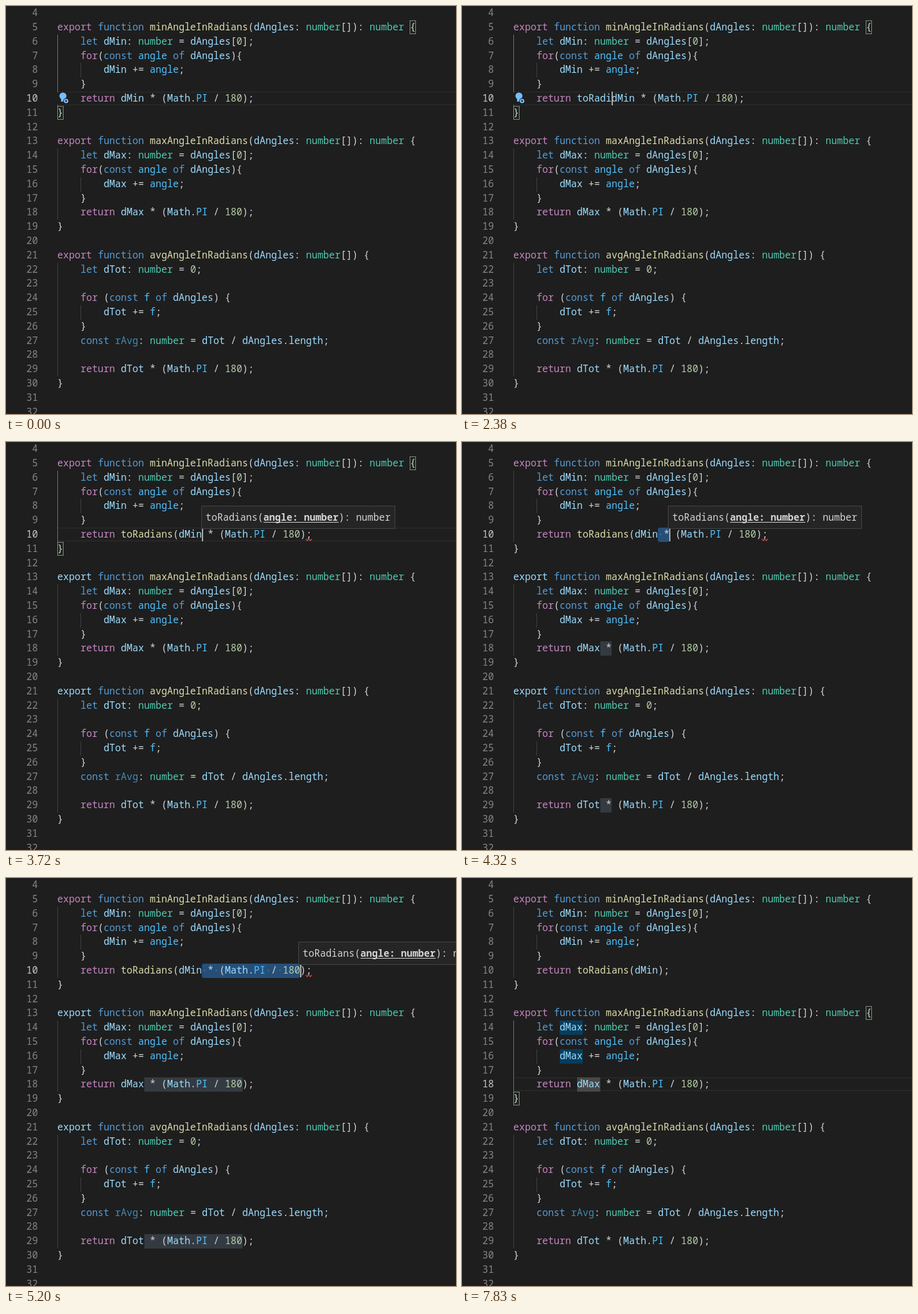
Recreate the animation shown at these times as an HTML page with a canvas. Size 719 by 653 pixels, loop 8000 ms.

```html
<!DOCTYPE html>
<html lang="en">
<head>
<meta charset="utf-8">
<style>
  html, body { margin: 0; height: 100%; overflow: hidden; background: #1e1e1e; }
  canvas { display: block; }
</style>
</head>
<body>
<canvas id="stage" width="719" height="653"></canvas>
<script>
const ctx = document.getElementById('stage').getContext('2d');
const LOOP = 8000, LEFT = 82, CHAR = 9.237, ROW = 22.8, FIRST_LINE = 4;
const MONO = '"Noto Sans Mono", monospace';
const CODE_SIZE = CHAR / 0.6;
const PUNCTUATION = '#d4d4d4';

const source = `
export function minAngleInRadians(dAngles: number[]): number {
    let dMin: number = dAngles[0];
    for(const angle of dAngles){
        dMin += angle;
    }
    return dMin * (Math.PI / 180);
}

export function maxAngleInRadians(dAngles: number[]): number {
    let dMax: number = dAngles[0];
    for(const angle of dAngles){
        dMax += angle;
    }
    return dMax * (Math.PI / 180);
}

export function avgAngleInRadians(dAngles: number[]) {
    let dTot: number = 0;

    for (const f of dAngles) {
        dTot += f;
    }
    const rAvg: number = dTot / dAngles.length;

    return dTot * (Math.PI / 180);
}

`.split('\n');

const tokenColors = [
  [/^(export|return|for)$/, '#c586c0'],
  [/^(function|let|const|of)$/, '#569cd6'],
  [/^number$/, '#4ec9b0'],
  [/^(angle|f|PI)$/, '#4fc1ff'],
  [/^rAvg$/, '#3f8bb4'],
  [/Radians$/, '#dcdcaa'],
  [/^\d+$/, '#b5cea8'],
  [/^\w+$/, '#9cdcfe'],
];

// Times at which each letter of the call is typed and the caret steps over the argument.
const typedAt = [1780, 1850, 1990, 2110, 2230, 2350, 2460, 2580, 2710, 2910];
const steppedAt = [3190, 3330, 3460, 3590];
const passed = (times, t) => times.filter(time => t >= time).length;
const between = (t, from, to) => t >= from && t < to;

const colX = col => LEFT + col * CHAR;
const rowY = line => Math.round(137 + (line - 10) * ROW);

function rect(x, y, w, h, color) {
  ctx.fillStyle = color;
  ctx.fillRect(x, y, w, h);
}

function frame(x, y, w, h, fill, stroke) {
  rect(x, y, w, h, fill);
  ctx.strokeStyle = stroke;
  ctx.lineWidth = 1;
  ctx.strokeRect(x + 0.5, y + 0.5, w - 1, h - 1);
}

function disc(x, y, r, color) {
  ctx.fillStyle = color;
  ctx.beginPath();
  ctx.arc(x, y, r, 0, Math.PI * 2);
  ctx.fill();
}

function text(str, x, y, color, { size = CODE_SIZE, weight = 400, align = 'left' } = {}) {
  ctx.font = `${weight} ${size}px ${MONO}`;
  ctx.textAlign = align;
  ctx.fillStyle = color;
  ctx.fillText(str, x, y);
}

function polyline(points, color, width) {
  ctx.strokeStyle = color;
  ctx.lineWidth = width;
  ctx.beginPath();
  points.forEach(([x, y]) => ctx.lineTo(x, y));
  ctx.stroke();
}

function highlight(line, col, count, color, radius = 0) {
  ctx.fillStyle = color;
  ctx.beginPath();
  ctx.roundRect(Math.round(colX(col)), rowY(line), Math.round(count * CHAR), 23, radius);
  ctx.fill();
}

function bracket(line, col) {
  frame(Math.round(colX(col)), rowY(line), 10, 22, '#1c251c', '#888888');
}

function guides(col, from, to, color = '#404040') {
  rect(Math.round(colX(col)), rowY(from), 1, rowY(to + 1) - rowY(from), color);
}

function codeLine(line, str, state) {
  for (const { 0: token, index } of str.matchAll(/\w+|[^\w\s]/g)) {
    let color = (tokenColors.find(([pattern]) => pattern.test(token)) || [0, PUNCTUATION])[1];
    const unresolved = token === 'export' && line > 10 && state.broken;
    if (unresolved) color = '#9cdcfe';
    text(token, colX(index), rowY(line) + 16, color);
  }
}

function bulb() {
  const y = rowY(10);
  rect(82, y + 1, 18, 20, '#1e1e1e');
  disc(91, y + 7, 5.6, '#75beff');
  rect(88, y + 10, 6, 6, '#75beff');
  disc(96, y + 15, 4.6, '#1e1e1e');
  disc(96, y + 15, 3.6, '#75beff');
  disc(96, y + 15, 1.4, '#1e1e1e');
}

function suggestions(t) {
  const rows = t < 1850 ? 2 : 1;
  ctx.shadowColor = 'rgba(0,0,0,.36)';
  ctx.shadowBlur = 8;
  frame(193, 159, 518, 5 + rows * 23, '#252526', '#454545');
  ctx.shadowBlur = 0;
  [['throw', 'Throw Exception'], ['trycatch', 'Try-Catch Statement']].slice(0, rows)
    .forEach(([label, detail], i) => {
      const y = 160 + i * 23, focused = i === 0, weight = focused ? 700 : 400;
      const ink = focused ? '#ffffff' : '#d4d4d4';
      if (focused) rect(194, y, 516, 23, '#094771');
      polyline([[199, y + 18], [199, y + 4.5], [213.5, y + 4.5], [213.5, y + 18]], ink, 1.4);
      for (let x = 198; x < 214; x += 3) rect(x, y + 18, 2, 2, ink);
      text('t', 220, y + 17, '#2aaaff', { weight: 700 });
      text(label.slice(1), 220 + CHAR, y + 17, ink, { weight });
      text(detail, 698, y + 16, focused ? '#c5d3dd' : '#a0a0a0',
        { size: 13.15, weight: focused ? 600 : 400, align: 'right' });
    });
}

function signature(x) {
  const y = 126;
  frame(x, 102, 310, 37, '#252526', '#454545');
  const at = col => x + 7 + col * CHAR;
  text('toRadians(', at(0), y, PUNCTUATION);
  text('angle: number', at(10), y, PUNCTUATION, { weight: 700 });
  rect(at(10), y + 2, 13 * CHAR, 1, PUNCTUATION);
  text('): number', at(23), y, PUNCTUATION);
}

function gutterHover(t) {
  const alpha = Math.max(0, Math.min((t - 6600) / 200, (7080 - t) / 200, 1)) * 0.8;
  ctx.globalAlpha = alpha;
  for (const line of [5, 7, 13, 15, 21, 24]) {
    const y = rowY(line) + 9;
    polyline([[64, y], [68.5, y + 4.5], [73, y]], '#c5c5c5', 1.2);
  }
  ctx.globalAlpha = 1;
  if (between(t, 6800, 6870)) disc(13, rowY(18) + 11, 5.5, '#6e1a13');
}

function selectedCount(t) {
  if (!between(t, 3790, 5470)) return 0;
  if (t < 4320) return 1;
  return t >= 5070 ? 17 : Math.min(16, 2 + Math.floor((t - 4320) / 35));
}

function caretCol(t) {
  if (t >= 7290) return 11;
  if (t >= 5470) return 25;
  return 11 + passed(typedAt, t) + passed(steppedAt, t) + selectedCount(t);
}

function caretVisible(t) {
  return between(t, 770, 1260) || between(t, 1780, 5930) ||
    between(t, 6460, 6990) || between(t, 7290, 7830);
}

function editedLine(t) {
  const call = 'toRadians('.slice(0, passed(typedAt, t));
  // A half-typed name must merge with the identifier that follows it.
  return '    return ' + call + (t >= 5470 ? 'dMin);' : 'dMin * (Math.PI / 180);');
}

function draw(t) {
  const state = { broken: between(t, 3060, 5600) };
  const selected = selectedCount(t);
  const current = t < 7290 ? 10 : 18;
  rect(0, 0, 719, 653, '#1e1e1e');

  if (!selected) {
    rect(LEFT, rowY(current), 637, 1.5, '#2a2a2a');
    rect(LEFT, rowY(current) + 20.5, 637, 1.5, '#2a2a2a');
  }
  guides(0, 6, 10, !selected && current === 10 ? '#707070' : '#404040');
  guides(0, 14, 18, current === 18 ? '#707070' : '#404040');
  guides(0, 22, 29);
  [8, 16, 25].forEach(line => guides(4, line, line));

  if (selected) highlight(10, 25, selected, '#264f78', 3);
  if (selected > 1) [18, 29].forEach(line => highlight(line, 15, selected, '#343a41'));
  if (t >= 7560) {
    highlight(14, 8, 4, '#083d5b');
    highlight(16, 8, 4, '#083d5b');
    highlight(18, 11, 4, '#474747');
  }

  if (t < 3790) { bracket(5, 61); bracket(11, 0); }
  if (between(t, 5600, 7290)) { bracket(10, 20); bracket(10, 25); }
  if (t >= 7360) { bracket(13, 61); bracket(19, 0); }

  for (let line = FIRST_LINE; line <= 32; line++) {
    text(line, 51, rowY(line) + 16, line === current ? '#c6c6c6' : '#858585', { align: 'right' });
    codeLine(line, line === 10 ? editedLine(t) : source[line - FIRST_LINE] || '', state);
  }

  [0, 2, 11, 13].filter(i => i < selected)
    .forEach(i => disc(colX(25.5 + i), rowY(10) + 11, 1, '#5b7896'));
  if (between(t, 3520, 5470)) {
    const wave = Array.from({ length: 5 }, (_, i) => [479 + i * 2.4, rowY(10) + (i % 2 ? 21 : 18)]);
    polyline(wave, '#f14c4c', 1.2);
  }
  if (t < 3720 || between(t, 6130, 7560)) bulb();
  gutterHover(t);
  if (caretVisible(t)) rect(Math.round(colX(caretCol(t))), rowY(current), 2, 22, '#aeafad');
  if (between(t, 1780, 1920)) suggestions(t);
  if (between(t, 2980, 5860)) {
    const settled = t >= 5070 ? t - 70 : t;
    signature(Math.floor(colX(caretCol(settled))) - (selectedCount(settled) ? 2 : 0));
  }
}

const start = performance.now();
function tick() {
  draw((performance.now() - start) % LOOP);
  requestAnimationFrame(tick);
}
tick();
</script>
</body>
</html>
```
